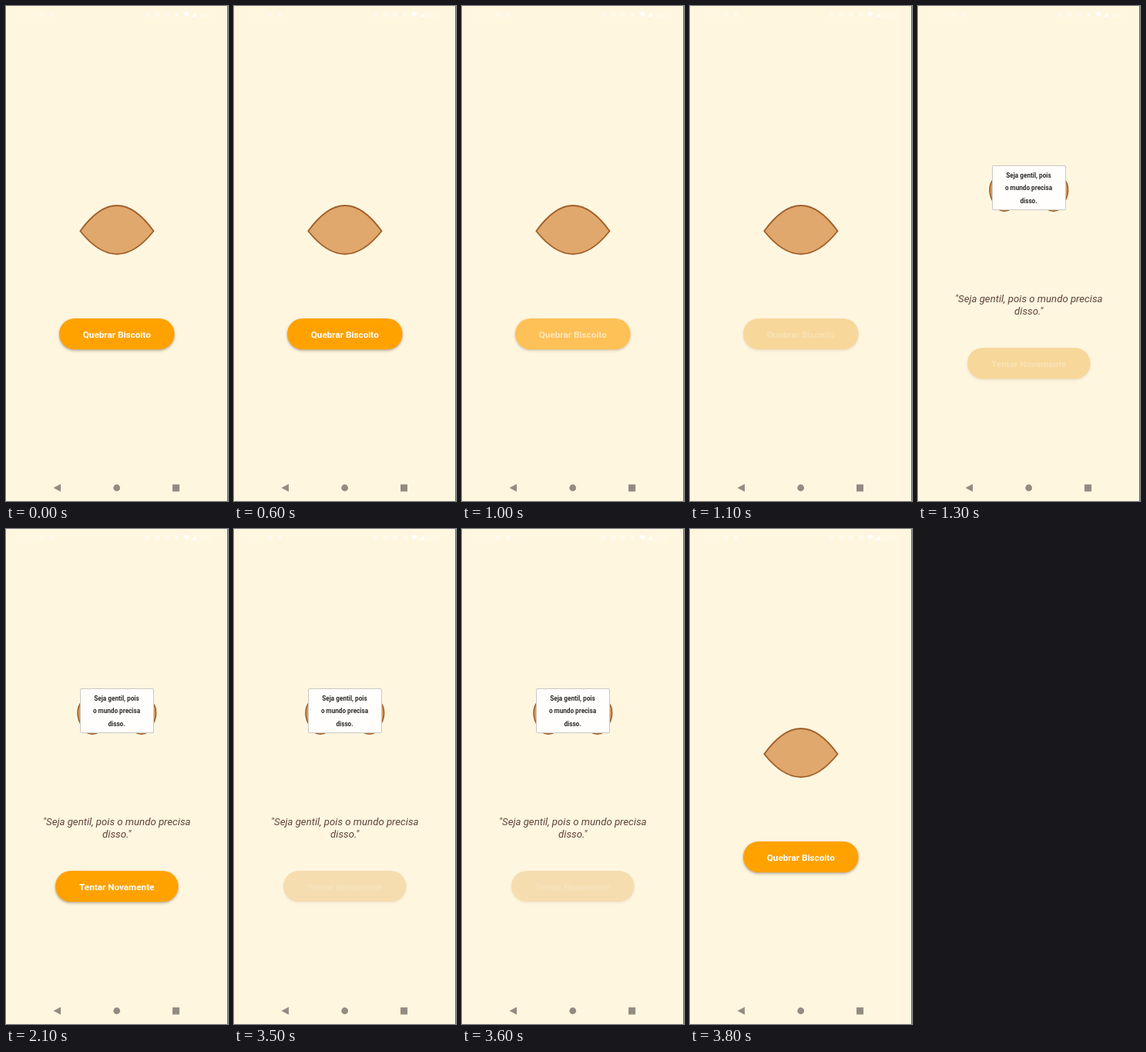
An HTML page with a canvas for the animation above (4.2 s loop, 288x640 px).

```html
<!DOCTYPE html>
<html lang="pt">
<head>
<meta charset="utf-8">
<title>Biscoito da sorte</title>
<style>
html, body { margin: 0; width: 100%; height: 100%; overflow: hidden; background: #fff6e0; }
canvas { display: block; width: 288px; height: 640px; }
</style>
</head>
<body>
<canvas id="stage" width="288" height="640"></canvas>
<script>
const ctx = document.getElementById('stage').getContext('2d');
const LOOP = 4200;
const BG = [255, 246, 224], ORANGE = [255, 162, 0];
const DOUGH = '#e0a86c', CRUST = '#a0602a';

// [start ms, cookie is open, button opacity]
const STEPS = [
  [0, false, 1], [1000, false, 0.6], [1100, false, 0.28],
  [1300, true, 0.28], [1400, true, 1],
  [3500, true, 0.18], [3700, false, 0.28], [3800, false, 1]
];

function text(str, x, y, font, color, align = 'center') {
  ctx.font = font + ' Roboto, sans-serif';
  ctx.fillStyle = color;
  ctx.textAlign = align;
  ctx.fillText(str, x, y);
}

function shape(d, fill, stroke, width) {
  const p = new Path2D(d);
  ctx.fillStyle = fill;
  ctx.fill(p);
  if (stroke) {
    ctx.strokeStyle = stroke;
    ctx.lineWidth = width;
    ctx.stroke(p);
  }
}

function statusBar() {
  const faint = 'rgba(255,255,255,.4)';
  text('10:14', 17, 15, '8px', faint, 'left');
  ctx.fillStyle = faint;
  for (const x of [44, 57, 181, 194, 206, 219]) ctx.fillRect(x, 9, 5, 5);
  shape('M229.5 9 Q234 6.5 238.5 9 L234 14.5 Z M240 14.5 L247 8 V14.5 Z', 'rgba(255,255,255,.9)');
  text('80%', 250, 15, '8px', 'rgba(255,255,255,.6)', 'left');
}

function navBar() {
  const grey = '#948c82';
  shape('M61.5 623 L71 618 V628 Z', grey);
  ctx.beginPath();
  ctx.arc(143.7, 623, 4.4, 0, Math.PI * 2);
  ctx.fill();
  ctx.fillRect(216, 618.5, 9, 9.2);
}

function button(label, x, y, w, alpha) {
  const dim = 1 - 0.06 * (1 - alpha);
  const mix = BG.map((c, i) => Math.round(c * dim * (1 - alpha) + ORANGE[i] * alpha));
  ctx.save();
  ctx.shadowColor = `rgba(70,50,20,${0.42 * alpha})`;
  ctx.shadowBlur = 3.5;
  ctx.shadowOffsetY = 1.6;
  ctx.fillStyle = `rgb(${mix})`;
  ctx.beginPath();
  ctx.roundRect(x, y, w, 40, 20);
  ctx.fill();
  ctx.restore();
  text(label, x + w / 2, y + 24.5, 'bold 11.73px', `rgba(255,255,255,${alpha})`);
}

function wholeCookie() {
  shape('M96.3 291 Q144 225 191.5 291 Q144 350.5 96.3 291 Z', DOUGH, CRUST, 1.8);
}

function halfCookie() {
  shape('M99 222 C90 232 92 246 99 255 L103 262 Q112 268.5 121 262 Z', '#dc9a5c', CRUST, 1.6);
}

function openCookie() {
  halfCookie();
  ctx.save();
  ctx.translate(287.6, 0);
  ctx.scale(-1, 1);
  halfCookie();
  ctx.restore();

  ctx.beginPath();
  ctx.roundRect(96.5, 206.5, 95, 57, 1.5);
  ctx.fillStyle = '#fffefc';
  ctx.fill();
  ctx.strokeStyle = '#cbc8c0';
  ctx.lineWidth = 1;
  ctx.stroke();
  ['Seja gentil, pois', 'o mundo precisa', 'disso.'].forEach((line, i) =>
    text(line, 143.5, 221.5 + i * 16.7, 'bold 8.2px', '#2e2b2a'));

  ['"Seja gentil, pois o mundo precisa', 'disso."'].forEach((line, i) =>
    text(line, 143.7, 383.3 + i * 15.5, 'italic 13.2px', '#5f4438'));
}

function draw(t) {
  const [, open, alpha] = STEPS.findLast(s => t >= s[0]);
  ctx.fillStyle = `rgb(${BG})`;
  ctx.fillRect(0, 0, 288, 640);
  statusBar();
  navBar();
  if (open) {
    openCookie();
    button('Tentar Novamente', 64, 442, 159.5, alpha);
  } else {
    wholeCookie();
    button('Quebrar Biscoito', 69, 404, 149.5, alpha);
  }
  ctx.fillStyle = '#6b655c';
  ctx.fillRect(287, 0, 1, 640);
}

const start = performance.now();
function tick(now) {
  draw(Math.max(0, now - start) % LOOP);
  requestAnimationFrame(tick);
}
draw(0);
requestAnimationFrame(tick);
</script>
</body>
</html>
```
